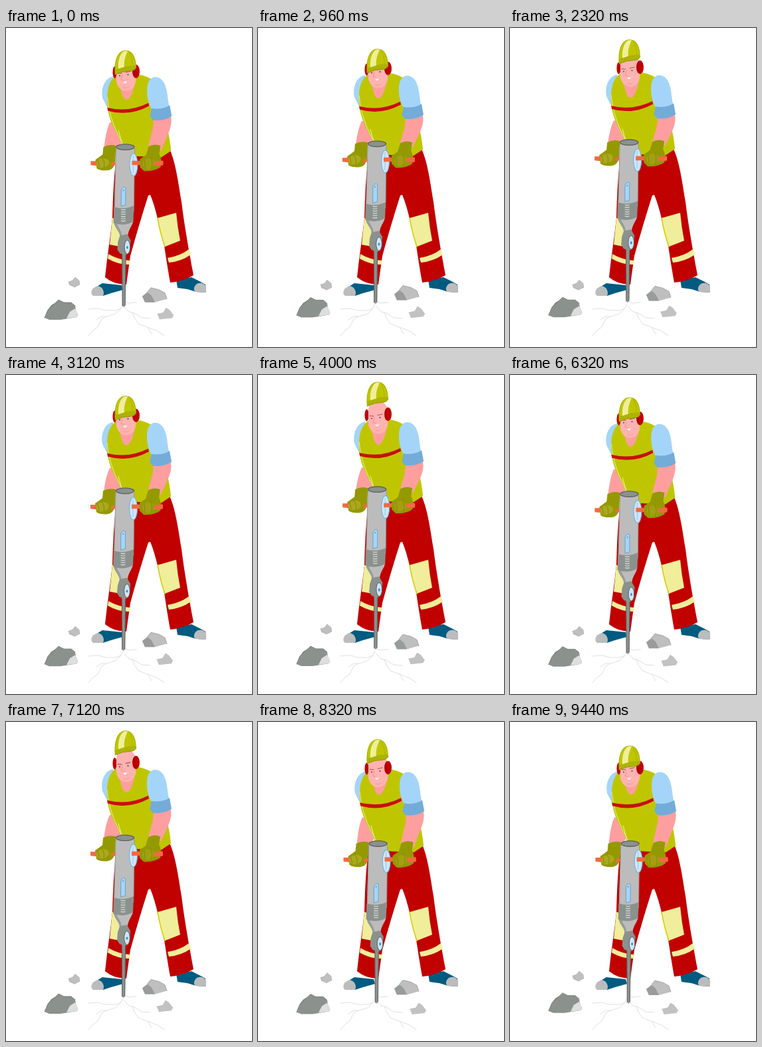
An HTML page with a canvas for the animation above (9.52 s loop, 370x480 px).

```html
<!DOCTYPE html>
<html lang="en">
<head>
<meta charset="utf-8">
<title>Road worker</title>
<style>
html, body { margin: 0; width: 100%; height: 100%; overflow: hidden; background: #fff; }
canvas { display: block; width: 370px; height: 480px; }
</style>
</head>
<body>
<canvas id="stage"></canvas>
<script>
const W = 370, H = 480, STEP = 80, COUNT = 119;
const canvas = document.getElementById('stage');
const ratio = window.devicePixelRatio || 1;
canvas.width = W * ratio;
canvas.height = H * ratio;
const ctx = canvas.getContext('2d');

const C = {
  vest: '#bfc600', olive: '#949900', hat: '#adb300', pale: '#f0ee9b',
  red: '#c10000', sky: '#a4d5f8', cuff: '#73acd8', skin: '#ff9e9f', face: '#ffb3b1',
  blush: '#f58588', steel: '#bcbcbc', iron: '#8b918d', dark: '#5c605e', teal: '#005b80',
  orange: '#f06a42', ice: '#cfe6f8', crack: '#e0e0e0'
};

function fill(d, color) {
  ctx.fillStyle = color;
  ctx.fill(new Path2D(d));
}

function line(d, color, width = 1) {
  ctx.strokeStyle = color;
  ctx.lineWidth = width;
  ctx.stroke(new Path2D(d));
}

function oval(x, y, rx, ry, color, edge, width = 1, turn = 0) {
  ctx.beginPath();
  ctx.ellipse(x, y, rx, ry, turn, 0, 2 * Math.PI);
  ctx.fillStyle = color;
  ctx.fill();
  if (edge) {
    ctx.strokeStyle = edge;
    ctx.lineWidth = width;
    ctx.stroke();
  }
}

function at(x, y, draw) {
  ctx.save();
  ctx.translate(x, y);
  draw();
  ctx.restore();
}

const wave = turns => Math.cos(2 * Math.PI * turns);

// Vertical travel of the drill: two strokes every seven steps.
const stroke = n => 2.9 + 5.7 * wave((n - 6.25) / 3.5);

// The helmet is airborne for about half of each bounce.
function hop(n) {
  const turns = (n - 50) * 18 / COUNT + 0.02;
  const p = (turns - Math.round(turns)) / 0.26;
  return Math.max(0, 20 * (1 - p * p));
}

function ground() {
  line('M176 415 L173 422 L165 425 L150 425 L139 422 L124 423 M173 422 L165 430 L149 435 L144 438 L138 450 L131 455 L124 463 M151 434 L144 434 L136 439', C.crack);
  line('M177 418 L185 427 L193 429 L204 436 L217 437 M190 428 L193 436 L199 445 L215 451 L228 456 L238 463 M213 450 L219 460 M177 411 L184 414 L196 413', C.crack);
}

function rocks(n, d) {
  at(0, 2.3 + 2.2 * wave(n * 15 / COUNT - 0.1), () => {
    fill('M58 432 L63 420 L68 413 L75 409 L79 405 L87 409 L98 409 L104 414 L105 420 L108 427 L107 431 L82 435 L65 435Z', C.iron);
    fill('M104 418 L96 423 L91 433 L107 431 L108 426Z', '#dedede');
    line('M58 432 L63 420 L75 409 L79 405 L87 409 L98 409 L104 414', '#6f7471', 0.8);
  });
  at(0, -2.2 * wave((n - 59) * 2 / 17), () => {
    fill('M94 384 L100 382 L104 377 L110 382 L111 388 L103 392 L95 389Z', '#bfbfbf');
    line('M94 384 L100 382 L104 377 L110 382 L111 388 L103 392Z', '#aaa', 0.6);
  });
  at(0, -1.8 * wave((n - 12) * 26 / COUNT + 0.09), () => {
    fill('M205 402 L213 395 L218 389 L230 392 L239 397 L242 406 L224 411 L209 411Z', '#bfbfbf');
    fill('M205 402 L213 396 L219 401 L224 411 L209 411Z', '#989c9a');
    line('M213 395 L218 389 L230 392 L239 397 L242 406', '#999', 0.8);
  });
  at(0.2 * d, 0.45 * d - 0.5, () => {
    fill('M227 429 L236 427 L240 420 L245 423 L251 431 L249 435 L230 437Z', '#c2c2c2');
    line('M227 429 L236 427 L240 420 L245 423 L251 431', '#aaa', 0.6);
  });
}

function legs() {
  fill('M145 384 L174 387 L176 394 L158 399 L146 403 L131 403 L130 393Z', C.teal);
  fill('M138 388 C145 389 149 397 146 403 L131 403 C126 400 128 391 138 388Z', C.steel);
  fill('M256 379 L279 375 L291 381 L300 386 L301 398 L286 397 L273 393 L258 391Z', C.teal);
  fill('M287 385 C293 382 300 385 301 390 L301 398 L285 397 C281 394 283 388 287 385Z', C.steel);
  fill('M168 180 L245 180 C255 200 259 232 264 262 C268 295 275 335 282 372 Q267 381 247 383 C243 362 240 340 238 328 C232 306 226 272 217 251 L214 252 Q199 299 187 343 L181 386 Q162 386 149 375 C152 345 157 315 160 286 C161 253 162 218 168 180Z', C.red);
  fill('M228 286 L256 278 Q258 300 262 320 L239 329 Q232 309 228 286Z', C.pale);
  line('M228 286 Q232 309 239 329', '#d6ce00', 1.5);
  fill('M160 286 L177 290 L172 329 L156 326Z', C.pale);
  fill('M243 346 Q262 343 275 333 L278 341 Q264 351 245 353Z', C.pale);
  fill('M154 340 Q169 349 187 350 L186 356 Q168 356 153 347Z', C.pale);
}

// Arms hang from the shoulders (sx, sy) and end at the drill handles (hx, hy).
function leftArm(sx, sy, hx, hy) {
  fill(`M${156 + sx} ${140 + sy} Q${150 + sx} ${152 + sy} ${147 + hx} ${176 + hy} L${164 + hx} ${180 + hy} L${178 + sx} ${166 + sy} L${166 + sx} ${142 + sy}Z`, C.skin);
  at(sx, sy, () => fill('M161 71 C147 74 142 91 145 104 Q149 113 154 121 L164 110Z', C.sky));
}

function torso() {
  fill('M166 70 C155 76 151 91 152 112 C153 132 160 145 167 159 L178 182 L193 191 L233 193 L248 183 Q246 162 241 145 L220 120 L218 75 Q208 69 196 68Z', C.vest);
  line('M152 102 C154 126 160 143 169 161 L176 174', '#e1e37a', 1.2);
  line('M169 153 L174 171', '#eef0a5', 1);
  fill('M152 118 Q184 126 214 111 L215 115.5 Q185 132 153 123Z', '#c90f0f');
  fill('M169 78 L195 72 C193 88 188 106 181 106 C174 105 174 95 169 78Z', C.skin);
}

function rightArm(sx, sy, hx, hy) {
  fill(`M${221 + sx} ${133 + sy} L${247 + sx} ${129 + sy} C${252 + sx} ${144 + sy} ${243 + sx} ${158 + sy} ${233 + hx} ${180 + hy} L${213 + hx} ${178 + hy} C${217 + sx} ${158 + sy} ${223 + sx} ${151 + sy} ${221 + sx} ${133 + sy}Z`, C.skin);
  at(sx, sy, () => {
    fill('M213 82 C218 68 231 70 237 80 C244 92 242 108 246 118 L221 123 C213 114 210 96 213 82Z', C.sky);
    fill('M219 119 Q233 122 246 114.5 L249 131 Q236 139 221 137 L216 131Z', C.cuff);
  });
}

function head() {
  oval(163.5, 64, 3, 9, C.red);
  fill('M166 78 L166 57 C166 48 171 43 180 43 C190 43 195 50 196 60 L195 79 C193 87 188 92 181 92 C174 92 168 87 166 78Z', C.face);
  line('M168 65 L174 65.5 M180 64 L187 62.5', '#a8564c', 1.1);
  oval(171, 69, 1, 1.1, '#34546e');
  oval(183.5, 67.5, 1.1, 1.1, '#34546e');
  line('M175 68 L173 75 L177 76', C.blush, 0.8);
  fill('M176 78 Q179 79 182 77 Q181 81 178 80.5Z', '#fff');
  line('M176 87 Q181 89 185 86', C.blush, 0.6);
  oval(195.5, 62.5, 5.5, 10.2, C.red);
  line('M193 55 Q190 62 194 70', '#86000c', 1);
}

function helmet() {
  fill('M164 69 C162 49 167 32 180 32 C192 32 196 46 196 58 Q193 63 188 63 Q175 63 164 69Z', C.hat);
  fill('M165 61 C164 46 170 33 180 33 C190 33 194 46 195 55 Q181 54 165 61Z', C.vest);
  fill('M169 60 C168 47 172 36 178 33 L183 33 C179 42 177 49 178 57Z', C.pale);
  line('M186 36 Q190 44 191 55', C.hat, 1);
  line('M164 68.5 Q175 63 188 63 Q193 63 196 58', '#8f9500', 1);
}

function drill() {
  fill('M174 333 L180 333 L179 413 L177 416 L174.5 413Z', C.iron);
  line('M174.3 338 L174.7 414 M179.6 338 L178.7 413', C.dark, 1);
  fill('M162 286 L191 286 C189 296 182 299 183 313 L171 313 C172 302 163 299 162 286Z', C.steel);
  fill('M162 289 C164 299 172 301 171 312 L174 312 C174 299 168 297 166 289Z', '#989c9a');
  fill('M171 308 L182 306 L187 315 L186 331 L181 337 L171 335 L167 329 L168 317Z', C.iron);
  oval(182, 325.5, 4.3, 10.3, C.ice, C.dark, 1);
  oval(182, 326, 1.4, 2.2, '#438cc0');
  fill('M165 175 L193 175 L192 272 L162 272Z', C.steel);
  line('M165 178 L163 265 M193 178 L192 263', '#8f9391', 0.9);
  fill('M162 265 Q177 270 192 263 L191 287 Q177 295 161 289Z', C.iron);
  for (let i = 0; i < 6; i++) {
    const y = 269 + i * 3.4;
    line(`M173 ${y} Q176 ${y + 1} 179 ${y}`, '#d6dad8', 1.2);
  }
  fill('M173 239 Q176 233 179.5 236 L179.5 262 L173 264Z', C.sky);
  line('M173 239 Q176 233 179.5 236 L179.5 262 L173 264Z', '#6198c0', 0.8);
  oval(176, 240, 0.8, 1, '#5583a5');
  oval(179, 175, 13.6, 4.2, C.iron, C.dark, 1.3);
  oval(191.5, 201.5, 6, 17, C.ice, '#71b6e5', 1.2);
  line('M191 188 L191 214', '#94c8ed', 1);
}

function gloves() {
  fill('M146 175 Q155 170 165 173 L164 193 Q164 208 153 210 Q142 211 136 207 L134 194 Q140 190 145 186Z', C.olive);
  oval(145, 199, 10, 7, '#aaa91d', null, 1, -0.2);
  line('M138 195 L140 204 M144 192 Q149 196 147 206', '#858a00', 1);
  fill('M127 196 L136 196 L136 203 L127 202Z', C.orange);
  fill('M158 198 L164 197 L164 202 L158 203Z', C.orange);
  fill('M189 195.5 L236 195.5 L236 202 L189 202Z', C.orange);
  fill('M214 174 Q223 169 232 173 L230 185 Q235 195 232 205 Q222 212 207 211 L201 205 L201 193 L210 187Z', C.olive);
  oval(214, 200, 9, 8, '#a29f12', null, 1, -0.3);
  line('M208 195 L209 206 M217 191 Q222 198 218 208', '#858a00', 1);
  fill('M223 196 L235 195.5 Q237 198 235 202.5 L223 203Z', C.orange);
}

function draw(n) {
  const d = stroke(n), hx = 0.025 * d * d, sx = hx * 0.7, sy = d * 0.4;
  ctx.setTransform(ratio, 0, 0, ratio, 0, 0);
  ctx.fillStyle = '#fff';
  ctx.fillRect(0, 0, W, H);
  ctx.lineCap = ctx.lineJoin = 'round';
  ground();
  rocks(n, d);
  legs();
  leftArm(sx, sy, hx, d);
  at(sx, sy, torso);
  rightArm(sx, sy, hx, d);
  at(0, d * 0.9 - 1, head);
  at(0, d * 0.5 - 0.5 - hop(n), helmet);
  at(hx, d, drill);
  at(hx, d, gloves);
}

const start = performance.now();
function tick() {
  draw(Math.floor((performance.now() - start) / STEP) % COUNT);
  requestAnimationFrame(tick);
}
tick();
</script>
</body>
</html>
```
